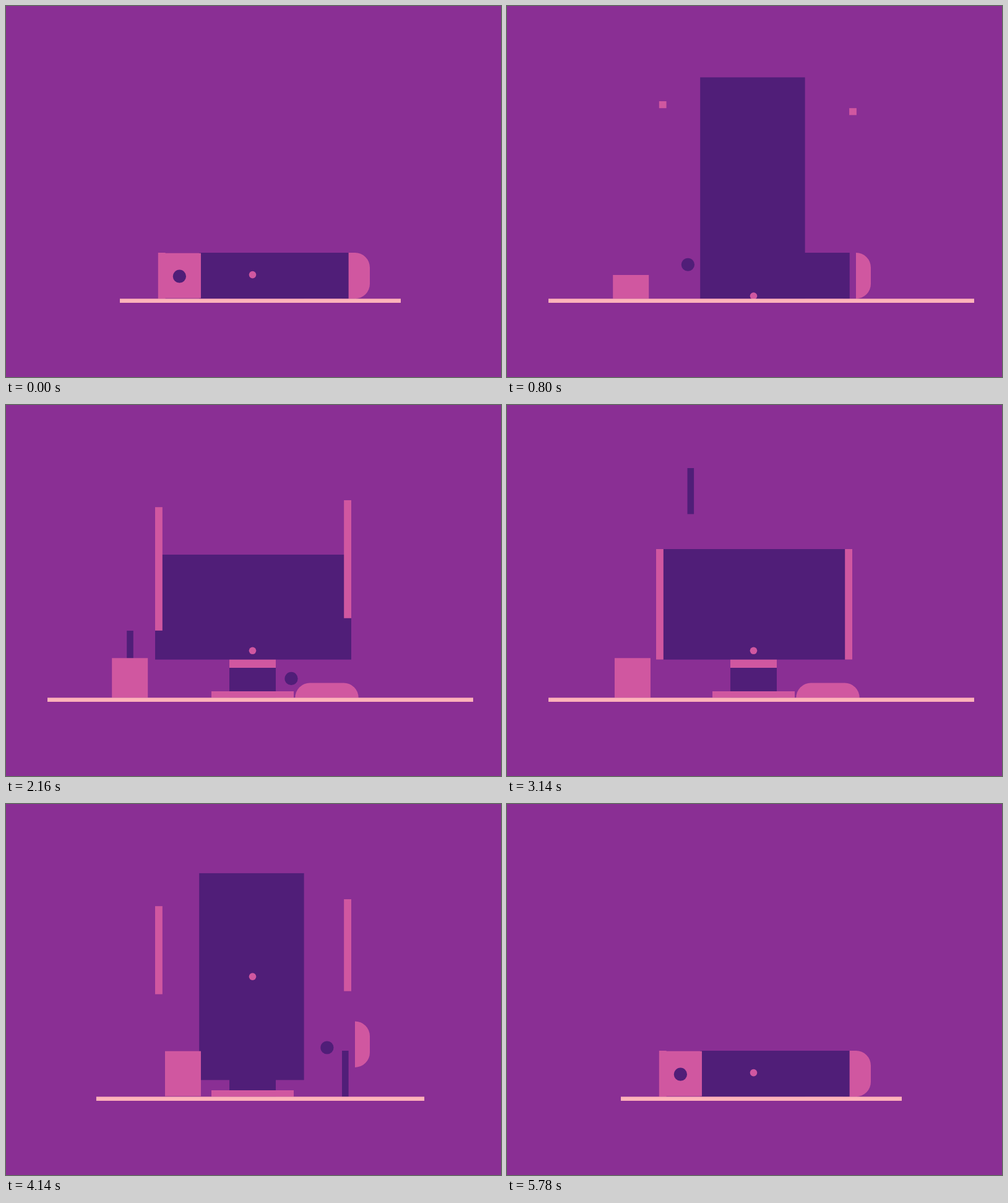
An HTML page that plays this animation: 800 by 600 pixels, repeating every 5.8 s.

```html
<!DOCTYPE html>
<html lang="en">
<head>
<meta charset="utf-8">
<title>Desk</title>
<style>
  html, body { margin: 0; width: 100%; height: 100%; overflow: hidden; background: #8a2f94; }
  svg { display: block; width: 800px; height: 600px; }
  .dark { fill: #501e78; }
  .pink { fill: #d057a0; }
  .pale { fill: #ffb3ba; }
</style>
</head>
<body>
<svg viewBox="0 0 800 600">
  <g id="scene">
    <rect id="stand" class="dark"/>
    <rect id="neck" class="pink"/>
    <rect id="base" class="pink"/>
    <rect id="screen" class="dark"/>
    <rect id="barA" class="pink"/>
    <rect id="barB" class="pink"/>
    <rect id="pencil" class="dark"/>
    <rect id="cup" class="pink"/>
    <circle id="dot" class="pink" cx="398.5" r="5.8"/>
    <circle id="ball" class="dark" r="10.6"/>
    <path id="mouse" class="pink"/>
    <rect id="desk" class="pale"/>
  </g>
</svg>
<script>
const LOOP = 5800;
const QUICK = 232;     // snap after the desk is hit
const GROUND = 473.4;  // top of the desk
const PACK = 399;      // top of the packed parts
const SEAT = 411.7;    // screen bottom when it rests on its neck

const part = {};
document.querySelectorAll('[id]').forEach(el => part[el.id] = el);

const lin = p => p;
const io = p => p < .5 ? 4 * p ** 3 : 1 - (2 - 2 * p) ** 3 / 2;
const mix = (a, b, p) => a + (b - a) * p;
const part01 = (t, start, span) => Math.min(1, Math.max(0, (t - start) / span));

// Goes from 0 to 1 at `go` and returns to 0 at `back`.
const trip = (t, go, back, span = 500, spanBack = span, ease = io) =>
  ease(part01(t, go, span)) - ease(part01(t, back, spanBack));

// Rises from 0 to 1 and falls again; `leap` is the snappier one.
const hump = (t, start, span) => Math.max(0, Math.sin(Math.PI * part01(t, start, span)));
const leap = (t, start, span) => Math.sqrt(hump(t, start, span));

function set(id, attrs) {
  for (const k in attrs) part[id].setAttribute(k, attrs[k]);
}
function box(id, left, top, right, bottom) {
  set(id, { x: left, y: top, width: Math.max(0, right - left), height: Math.max(0, bottom - top) });
}

function drawDesk(t) {
  const wide = 117 * trip(t, 0, 3800, 600);
  box('desk', 184 - wide, GROUND, 638 + wide, 480);
  const dip = 19 * (hump(t, 800, 390) + hump(t, 3610, 390));
  set('scene', { transform: `translate(0 ${dip})` });
}

// Strips slide out of the stand's right side, then pull in their tails.
function drawStand(t) {
  const edge = 553.3;
  const head = trip(t, 950, 4800, 400), tail = trip(t, 1560, 4250, 340);
  box('stand', 361, PACK, mix(edge, 436, trip(t, 900, 4250, 340)), GROUND);
  box('neck', mix(edge, 361, head), 411, mix(edge, 436, tail), 425);
  box('base', mix(edge, 332, head), 463, mix(edge, 465, tail), GROUND);
}

function drawScreen(t) {
  const air = trip(t, 1000, 1560, 520);
  const wide = trip(t, 1560, 3450, 560, 240);
  const bottom = mix(GROUND, SEAT, trip(t, 1000, 4020, 520, 230)) - 88 * air;

  const tall = mix(GROUND - PACK, t < LOOP / 2 ? 358 : 334.5, trip(t, 100, 4670, 400));
  const height = mix(tall, 178.7, trip(t, 900, 3585, 1000, QUICK)) - 9 * hump(t, 2000, 320);

  const half = mix(84.7, 158.5, wide) - 10.7 * trip(t, 900, 1560, 400);
  const mid = mix(396.9, 399.5, wide);
  box('screen', mid - half, bottom - height, mid + half, bottom);

  // The dot hangs above the lower edge, or floats to the middle.
  const hang = mix(38.8, 14.4, trip(t, 1560, 3800)) + 10.7 * air - 34.4 * trip(t, 600, 860, 200, 540);
  set('dot', { cy: bottom - mix(hang, height / 2, trip(t, 3560, 4250, 160, 870)) });
}

// Bezel bars shrink to squares, swap sides and stretch again.
function drawBar(id, t, home, away, y, lag) {
  const x = mix(home, away, trip(t, 1160, 4323, 614));
  const top = mix(PACK, y, trip(t, 100 + lag, 4950, 400));
  const bottom = mix(GROUND, y + 11.2, trip(t, 250 + lag, 4900, 400));
  box(id, x, mix(top, 233, trip(t, 2180, 3600, QUICK)),
    x + 11.8, mix(bottom, SEAT, trip(t, 1864 + lag, 3900)));
}

function drawPencil(t) {
  const x = mix(543, 195.2, trip(t, 880, 2960, 650, 650, lin));
  const y = PACK - 34 * trip(t, 1800, 2960, 340)
    - 370 * (hump(t, 880, 650) + hump(t, 2960, 650));
  box('pencil', x, y, x + 10.6, y + 74.4);
}

function drawCup(t) {
  const x = mix(257, 171.2, trip(t, 150, 3050, 450));
  const open = trip(t, 450, 3150, 350);
  const squash = 25.7 * trip(t, 450, 900, 350);
  box('cup', x, mix(399.7, 409.3, open) + squash, x + 58, mix(472.6, GROUND, open));
}

function drawBall(t) {
  const ride = part01(t, 703, 1852) - io(part01(t, 3760, 1540));
  set('ball', {
    cx: mix(280.4, 510, ride) + 30.5 * trip(t, 3600, 3900, 120, 600),
    cy: mix(437.2, 461, ride) - 45 * leap(t, 703, 1500) - 196 * leap(t, 3600, 560)
  });
}

// The mouse tips over on its flat side and is tossed back upright.
function drawMouse(t) {
  const tilt = 90 * trip(t, 1700, 3580, 400, QUICK);
  const half = mix(37.2, 51.2, trip(t, 1800, 3600, 320, 120));
  const a = tilt * Math.PI / 180;
  const x = mix(576, 518.5, trip(t, 1700, 3600, 400, QUICK));
  const y = GROUND - half * Math.cos(a) - 12 * Math.sin(a) - 142 * leap(t, 3600, 560);
  set('mouse', {
    d: `M-12 ${-half}A24 24 0 0 1 12 ${24 - half}V${half - 24}A24 24 0 0 1 -12 ${half}Z`,
    transform: `translate(${x} ${y}) rotate(${-tilt})`
  });
}

function draw(t) {
  drawDesk(t);
  drawStand(t);
  drawScreen(t);
  drawBar('barA', t, 245.8, 546.2, 154, 0);
  drawBar('barB', t, 553.1, 241, 165.2, -20);
  drawPencil(t);
  drawCup(t);
  drawBall(t);
  drawMouse(t);
}

let begin;
function tick(now) {
  begin ??= now;
  draw((now - begin) % LOOP);
  requestAnimationFrame(tick);
}
draw(0);
requestAnimationFrame(tick);
</script>
</body>
</html>
```
